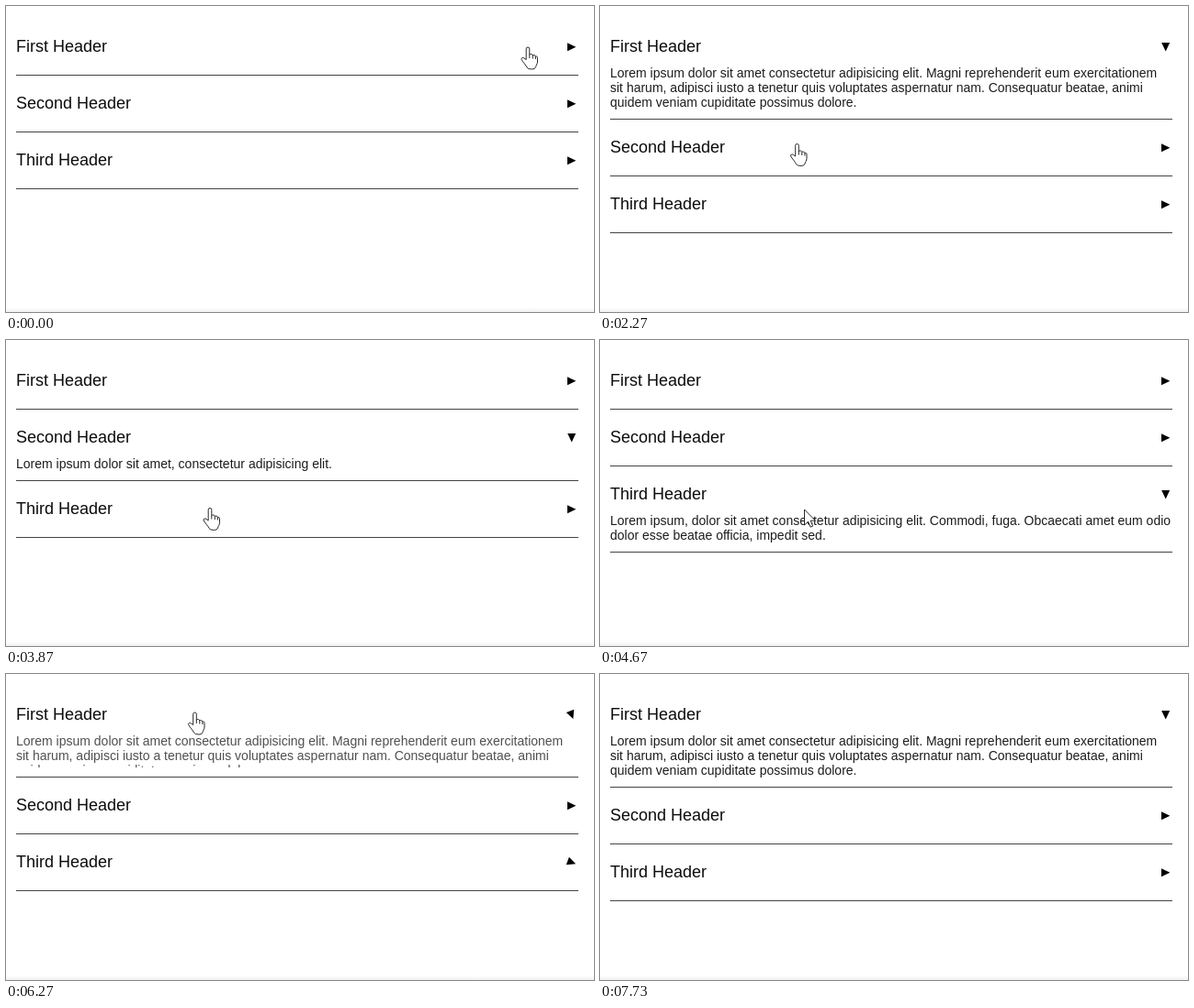
An HTML page that plays this animation: 640x334 px, repeating every 8.07 s.

```html
<!DOCTYPE html>
<html lang="en">
<head>
<meta charset="utf-8">
<title>Accordion</title>
<style>
  html, body { margin: 0; width: 100%; height: 100%; overflow: hidden; background: #fff; }
  svg { display: block; font-family: "Liberation Sans", Arial, sans-serif; }
  .title { font-size: 18px; fill: #0c0c0c; }
  .body { font-size: 14px; fill: #1c1c1c; }
  .cursor path { fill: #fff; stroke: #111; stroke-width: .9; stroke-linejoin: round; }
</style>
</head>
<body>
<svg id="stage" width="640" height="334" viewBox="0 0 640 334">
  <defs>
    <linearGradient id="shade" x2="0" y2="1">
      <stop stop-color="#fff"/><stop offset="1" stop-color="#f1f1f1"/>
    </linearGradient>
  </defs>
  <rect y="329" width="640" height="5" fill="url(#shade)"/>
  <g id="rows"></g>
  <g id="hand" class="cursor">
    <path d="M-1.8 13.5V1.8a1.8 1.8 0 0 1 3.6 0V8.2C2.5 7 5.2 7.2 5.3 9C6 8.2 8.3 8.4 8.4 10.2C9.2 9.4 10.4 9.8 10.5 11.6V16C10.5 18 8.8 20 8.6 21.5Q8 24 4.5 24Q0 24-1 22C-2 19.5-5.5 16-6.8 13.5C-7.6 11.8-5.5 10.6-4 12Z"/>
    <path d="M1.8 8V12M5.3 9V12.5M8.4 10.2V13"/>
  </g>
  <g id="pointer" class="cursor">
    <path d="M0 0V17L4 13.2L6.6 19.2L9.2 18L6.6 12.2H12Z"/>
  </g>
</svg>
<script>
const LOOP = 8070, OPEN_MS = 300, CLOSE_MS = 150, LINE = 16;

const sections = [
  ["First Header", [
    "Lorem ipsum dolor sit amet consectetur adipisicing elit. Magni reprehenderit eum exercitationem",
    "sit harum, adipisci iusto a tenetur quis voluptates aspernatur nam. Consequatur beatae, animi",
    "quidem veniam cupiditate possimus dolore."]],
  ["Second Header", ["Lorem ipsum dolor sit amet, consectetur adipisicing elit."]],
  ["Third Header", [
    "Lorem ipsum, dolor sit amet consectetur adipisicing elit. Commodi, fuga. Obcaecati amet eum odio",
    "dolor esse beatae officia, impedit sed."]]
];

// [time, section opened]; opening one closes the previous one
const clicks = [[1050, 0], [2802, 1], [4250, 2], [6130, 0]];

// [time, x, y] of the cursor hotspot
const path = [
  [0, 568, 45], [1400, 568, 45], [2230, 214.5, 150.5], [2500, 214.5, 150.5], [2700, 214.5, 152.5],
  [3330, 214.5, 152.5], [3950, 222.5, 185], [4720, 222.5, 185], [5570, 205.5, 42],
  [6820, 205.5, 42], [7400, 240, 350], [LOOP, 240, 350]
];

const $ = id => document.getElementById(id);
const clamp = v => Math.min(1, Math.max(0, v));

// CSS "ease": cubic-bezier(.25, .1, .25, 1)
function ease(x) {
  x = clamp(x);
  if (x === 0 || x === 1) return x;
  const bezier = (a, b, s) => 3 * a * s * (1 - s) ** 2 + 3 * b * s * s * (1 - s) + s ** 3;
  let lo = 0, hi = 1;
  for (let i = 0; i < 20; i++) {
    const mid = (lo + hi) / 2;
    if (bezier(.25, .25, mid) < x) lo = mid; else hi = mid;
  }
  return bezier(.1, 1, lo);
}

$("rows").innerHTML = sections.map(([title, lines]) => `<g>
  <text class="title" x="11" y="6">${title}</text>
  <path class="arrow" d="M-4.7-4.5L4.7 0L-4.7 4.5Z"/>
  <svg class="body" y="21" width="640" height="0">
    ${lines.map((s, i) => `<text x="11" y="${13 + i * LINE}">${s}</text>`).join("")}
  </svg>
  <rect class="rule" x="11" width="612" height="1" fill="#444"/>
</g>`).join("");

const rows = [...$("rows").children].map((group, i) => ({
  group,
  arrow: group.querySelector(".arrow"),
  body: group.querySelector(".body"),
  rule: group.querySelector(".rule"),
  full: sections[i][1].length * LINE
}));

// How far a section is open at time t, for a change lasting the given times
function openness(i, t, openMs, closeMs) {
  const last = clicks.filter(c => c[0] <= t).length - 1;
  if (last < 0) return 0;
  const elapsed = t - clicks[last][0];
  if (clicks[last][1] === i) return ease(elapsed / openMs);
  return last > 0 && clicks[last - 1][1] === i ? 1 - ease(elapsed / closeMs) : 0;
}

function cursorAt(t) {
  const k = path.findIndex(p => p[0] > t);
  const [t0, x0, y0] = path[k - 1], [t1, x1, y1] = path[k];
  const s = (1 - Math.cos(Math.PI * (t - t0) / (t1 - t0))) / 2;
  return [x0 + (x1 - x0) * s, y0 + (y1 - y0) * s];
}

function draw(t) {
  const [cx, cy] = cursorAt(t).map(v => Math.round(v * 2) / 2);
  let y = 44, overHeader = false;
  rows.forEach((row, i) => {
    const height = row.full * openness(i, t, OPEN_MS, CLOSE_MS);
    const turn = openness(i, t, OPEN_MS, OPEN_MS);
    const top = Math.round(y), shown = Math.round(y + height) - top;
    row.group.setAttribute("transform", `translate(0 ${top})`);
    row.arrow.setAttribute("transform", `translate(615.7 .7) rotate(${90 * turn})`);
    row.body.setAttribute("height", shown);
    row.body.style.opacity = shown ? turn : 0;
    row.rule.setAttribute("y", 31 + shown);
    if (Math.abs(cy - y) < 17) overHeader = true;
    y += 62 + height;
  });
  // The hand lingers while the second section unfolds beneath it
  const hand = overHeader || (t > 2800 && t < 3000);
  for (const [id, visible] of [["hand", hand], ["pointer", !hand]]) {
    $(id).setAttribute("transform", `translate(${cx} ${cy})`);
    $(id).style.display = visible ? "" : "none";
  }
}

const start = performance.now();
function tick() {
  draw((performance.now() - start) % LOOP);
  requestAnimationFrame(tick);
}
tick();
</script>
</body>
</html>
```
